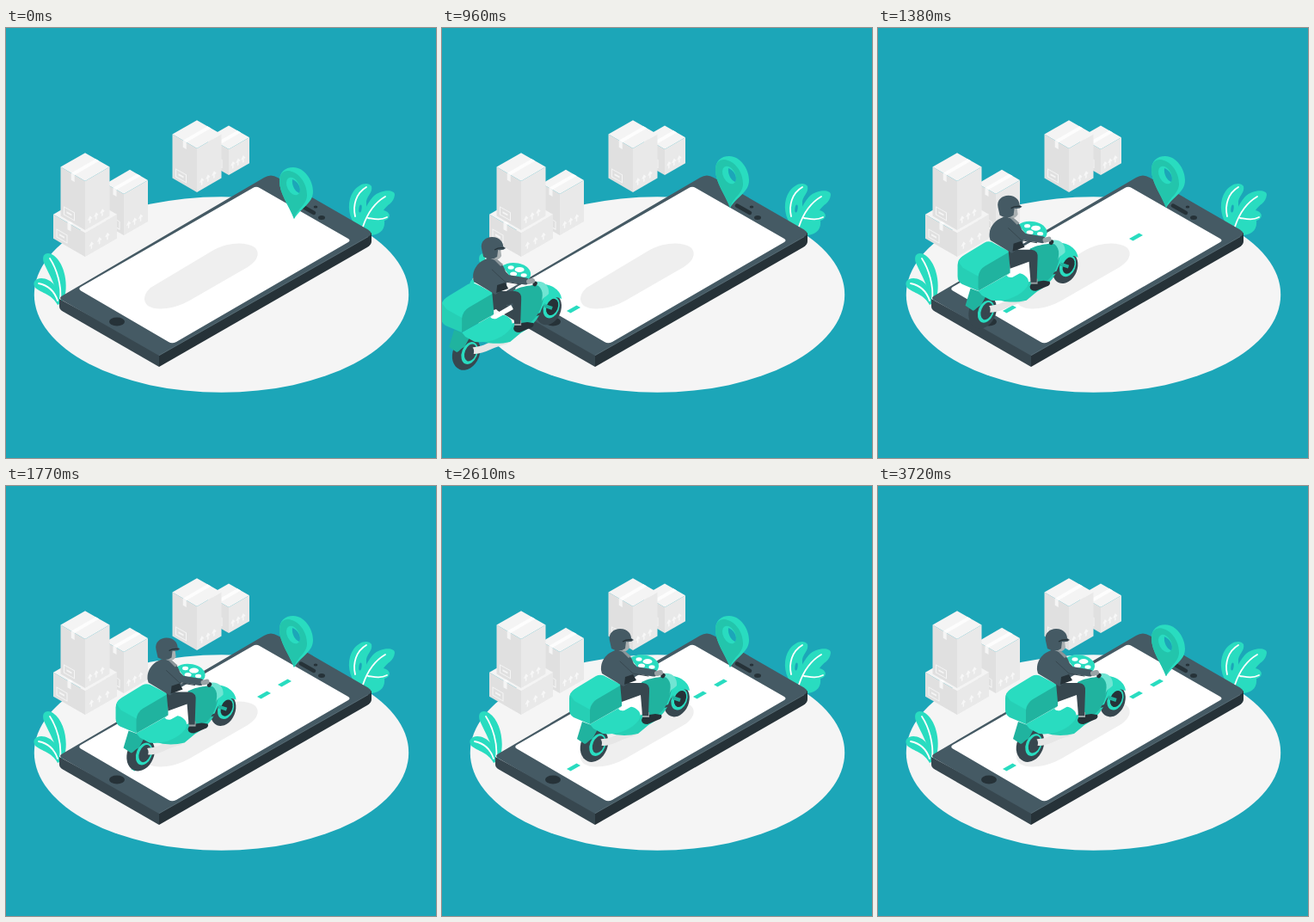
Recreate the animation shown at these times as an HTML page. Size 500x500 px, loop 3.75 s.

```html
<!DOCTYPE html>
<html lang="en">
<head>
<meta charset="utf-8">
<title>Delivery scooter</title>
<style>
  html, body { margin: 0; width: 100%; height: 100%; overflow: hidden; background: #1ca6b8; }
  svg { display: block; width: 100vw; height: 100vh; }
  .mint { fill: #29dcc0; }
  .mid { fill: #26cfb5; }
  .deep { fill: #20b39f; }
  .slate { fill: #455a64; }
  .dark { fill: #37474f; }
  .ink { fill: #263238; }
  .rib { fill: none; stroke: #fff; stroke-width: 1.8; stroke-linecap: round; }
  .limb { fill: none; stroke-linecap: round; stroke-linejoin: round; }
</style>
</head>
<body>
<svg viewBox="0 0 500 500">
  <ellipse cx="250.5" cy="310" rx="217.7" ry="113.8" fill="#f5f5f5"/>
  <g id="boxes"></g>

  <g id="plants">
    <path class="mint" d="M62 321C60 302 50 287 44 273C41 264 46 260 53 263C67 270 73 296 68 314Z"/>
    <path class="mint" d="M60 322C53 309 42 309 34 302C30 296 34 291 41 291C53 291 63 303 64 320Z"/>
    <path class="rib" d="M63 316C65 300 59 280 51 268M60 317C56 305 48 299 38 297"/>
    <path class="mint" d="M405 228C397 216 397 200 404 190C410 181 421 178 425 184C427 192 418 196 419 204C420 214 416 224 412 232Z"/>
    <path class="mint" d="M413 237C411 222 418 206 427 196C435 188 452 187 452 194C451 204 443 205 439 212C448 214 448 222 440 224C441 232 437 240 425 241Z"/>
    <ellipse cx="412" cy="210" rx="1.6" ry="4.5" fill="#1ca6b8" transform="rotate(8 412 210)"/>
    <path class="rib" d="M406 219C403 206 407 192 419 185M415 231C420 216 429 203 441 196M421 221C428 222 435 224 443 220"/>
  </g>

  <g id="phone">
    <path class="dark" d="M62 315V324Q62 327 66 329.500L178 394V378Z"/>
    <path class="ink" d="M178 379V394L420 255Q425 252 425 248V238Z"/>
    <path class="slate" d="M66 311L300 174Q308 169 316 174L421 234.500Q428 239 421 243L178 381L66 317Q60 314 66 311Z"/>
    <path d="M178 380.700L421 242.700" fill="none" stroke="#5b6f78" stroke-width=".8"/>
    <path fill="#fff" d="M87 301L287 186Q291 183.500 295 186L398 245Q401 247 398 249L198 365Q193 367.500 189 365L87 305.500Q83.500 303 87 301Z"/>
    <ellipse class="ink" cx="129" cy="341.500" rx="9" ry="5"/>
    <path d="M343 206.500L358 215" stroke="#263238" stroke-width="4.500" stroke-linecap="round"/>
    <ellipse class="ink" cx="360" cy="208" rx="2.300" ry="1.500"/>
    <ellipse class="ink" cx="367" cy="220.500" rx="4" ry="2.500"/>
    <path fill="#efefef" d="M168 302L240 259C257 249 279 248 289 255C297 262 291 272 281 278L215 316C198 326 176 330 165 323C158 317 161 308 168 302Z"/>
  </g>
  <g id="dashes"></g>

  <g id="pin">
    <path class="mint" d="M335 222C329 206 318 193 318 178C318 168 324 162 334 162C347 162 357 177 357 190C357 204 344 208 335 222Z"/>
    <path fill="#23c5ac" d="M335 222C329 206 318 193 318 178C318 170 322 166 328 166C340 167 350 180 350 194C350 206 339 209 335 222Z"/>
    <ellipse class="mint" cx="334" cy="184" rx="7" ry="11" transform="rotate(-28 334 184)"/>
    <path fill="#1ca6b8" d="M333 176C339 178 344 186 341 192C336 190 332 183 333 176Z"/>
  </g>

  <g id="scooter">
    <!-- front wheel and fender -->
    <ellipse class="dark" cx="273" cy="250" rx="14" ry="19" transform="rotate(22 273 250)"/>
    <ellipse class="mint" cx="276" cy="248" rx="9" ry="13" transform="rotate(22 276 248)"/>
    <ellipse class="ink" cx="277" cy="247.500" rx="6.500" ry="10" transform="rotate(22 277 247.500)"/>
    <path d="M268 246L277 249" stroke="#20b39f" stroke-width="4"/>
    <path class="mint" d="M255 224C268 216 287 225 288 238C277 233 268 240 263 254L252 258Z"/>

    <!-- rear wheel and exhaust -->
    <ellipse class="dark" cx="177" cy="301" rx="15.500" ry="20.500" transform="rotate(22 177 301)"/>
    <ellipse class="mint" cx="181" cy="301" rx="9" ry="13.500" transform="rotate(22 181 301)"/>
    <ellipse class="dark" cx="182" cy="300.500" rx="6.500" ry="10.500" transform="rotate(22 182 300.500)"/>
    <path class="limb" d="M187 298C200 298 205 290 222 287" stroke="#e6e6e6" stroke-width="8"/>
    <ellipse class="dark" cx="183" cy="299" rx="3" ry="5"/>

    <!-- body -->
    <path class="deep" d="M163 274L182 281L175 294C170 296 168 300 166 300L157 294Z"/>
    <path class="mid" d="M188 284L232 266L262 257C257 266 249 273 240 278L228 288C215 291 200 291 188 284Z"/>
    <path class="mint" d="M172 277L206 258C222 252 235 262 229 272C220 284 203 290 187 288L176 282Z"/>
    <path class="deep" d="M232 228C240 224 247 223 254 222C266 221 269 230 266 241C263 254 256 264 247 268L236 274Z"/>
    <path fill="#70e5d3" d="M254 219C266 215 274 222 273 232C270 236 266 235 264 243C268 230 265 223 254 219Z"/>

    <!-- instruments -->
    <path class="mint" d="M219 200C227 193 246 196 251 205C254 211 250 217 244 218L228 212Z"/>
    <g fill="#fff">
      <ellipse cx="239" cy="204" rx="5.500" ry="3"/>
      <ellipse cx="229" cy="201.500" rx="3.500" ry="2.200"/>
      <ellipse cx="244" cy="210.500" rx="3.500" ry="2.200"/>
      <ellipse cx="232" cy="209" rx="4" ry="2.500"/>
    </g>
    <ellipse class="ink" cx="257" cy="220.500" rx="2.500" ry="3" transform="rotate(30 257 220.500)"/>

    <!-- luggage box -->
    <path class="mid" d="M148 247Q148 240 155 236L175 250L172 277L153 269Q148 266 148 260Z"/>
    <path class="mint" d="M149 243Q150 239 156 235L179 221Q185 218 191 222L210 232L180 249Q173 253 172 260L154 250Z"/>
    <path class="deep" d="M172 277V261Q173 252 180 248L209 231V256Z"/>
    <path fill="#fff" d="M205 259L229 245L232 250L212 261Q207 262 205 259Z"/>

    <!-- rider -->
    <path class="ink" d="M234 267L248 265L255 266Q257 270 251 272L239 277Q232 277 232 272Z"/>
    <path fill="#9aa3a6" d="M233 263H241V269H233Z"/>
    <path class="dark" d="M207 229L234 229Q242 230 241 239L240 267H233L231 243L209 251Z"/>
    <path class="slate" d="M185 214C184 202 193 192 206 190C217 192 222 201 224 211L224 224L211 233L186 218Z"/>
    <path class="ink" d="M213 222L222 219L226 226L212 231Z"/>
    <path class="limb" d="M211 200L225 214L246 217.500" stroke="#455a64" stroke-width="8"/>
    <path class="limb" d="M207 204L222 218L240 221" stroke="#37474f" stroke-width="1"/>
    <path class="limb" d="M250 218L254 217" stroke="#9aa3a6" stroke-width="6"/>
    <path fill="#a9b0b2" d="M205 184L217 180L218 188Q216 192 211 193L205 191Z"/>
    <path fill="#8b969a" d="M208 191L213 192L220 198L217 200Z"/>
    <path class="slate" d="M195 180C193 171 200 166 207 166C216 166 220 172 220 177L223 179Q220 182 214 181L213 189Q206 194 197 189Z"/>
    <path d="M210 181Q215 178 221 179" fill="none" stroke="#263238" stroke-width="1.300"/>
  </g>
</svg>
<script>
const LOOP = 3750;
const $ = id => document.getElementById(id);
const clamp = v => Math.max(0, Math.min(1, v));
const SLOPE = 0.575;

// x, y: nearest top corner; a, b: left and right widths; h: height
function carton(x, y, a, b, h) {
  const face = (m, body) => `<g transform="matrix(${m},${x},${y})">${body}</g>`;
  const arrow = u =>
    `<path d="M${u} ${h - 5}v-6m-2 2l2 -3l2 3" fill="none" stroke="#f7f7f7" stroke-width="1.5"/>`;
  const left = `<rect x="${-a}" width="${a}" height="${h}" fill="#e0e0e0"/>
    <rect x="${-a / 2 - 2}" width="4" height="8" fill="#f5f5f5"/>
    <rect x="${4 - a}" y="${h - 13}" width="12" height="9" fill="none" stroke="#f5f5f5"/>
    <path d="M${7 - a} ${h - 8.5}h6" stroke="#f5f5f5" stroke-width="2"/>`;
  const right = `<rect width="${b}" height="${h}" fill="#e9e9e9"/>` +
    [.2, .45, .7].map(k => arrow(k * b)).join("");
  const top = `<rect x="${-a}" width="${a}" height="${b}" fill="#f4f4f4"/>
    <rect x="${-a / 2 - 2}" width="4" height="${b}" fill="#fdfdfd"/>`;
  return face(`1,${SLOPE},0,1`, left) + face(`1,${-SLOPE},0,1`, right) +
    face(`1,${SLOPE},1,${-SLOPE}`, top);
}

$("boxes").innerHTML = [
  [259, 141, 24, 24, 30],
  [222, 140, 28.5, 28.5, 51],
  [137, 193, 21, 28, 48],
  [92, 238, 37, 37, 28],
  [92, 178, 28.5, 28.5, 57]
].map(c => carton(...c)).join("");

// x, y, time of appearance
const dashes = [[153, 327, 760], [300, 243, 1180], [324, 229, 1480]];
$("dashes").innerHTML = dashes.map(([x, y]) =>
  `<path class="mint" d="M${x - 8} ${y + 2}l11.5 -6.600l4.500 2.600l-11.500 6.600z"/>`).join("");
const marks = [...$("dashes").children];

// time, height, power of the ease-in (0 = smooth)
const hop = [[0, 0, 1], [360, 0, 0], [960, -13, 1], [1380, -13, 0], [1770, -11, 1], [3030, -11, 2], [LOOP, 0, 1]];
function pinY(t) {
  const i = hop.findIndex((k, n) => n && t <= k[0]) - 1;
  const [t0, y0, pow] = hop[i], [t1, y1] = hop[i + 1];
  const s = (t - t0) / (t1 - t0);
  return y0 + (y1 - y0) * (pow ? s ** pow : s * s * (3 - 2 * s));
}

function draw(t) {
  const away = Math.max(0, 154 * Math.exp(-2.23 * (t - 960) / 1000) - 4.8);
  $("scooter").setAttribute("transform", `translate(${-away} ${away * 0.517})`);
  $("pin").setAttribute("transform", `translate(0 ${pinY(t)})`);
  marks.forEach((m, i) => m.setAttribute("opacity", clamp((t - dashes[i][2]) / 150)));
}

const start = performance.now();
function tick() {
  draw((performance.now() - start) % LOOP);
  requestAnimationFrame(tick);
}
draw(0);
tick();
</script>
</body>
</html>
```
